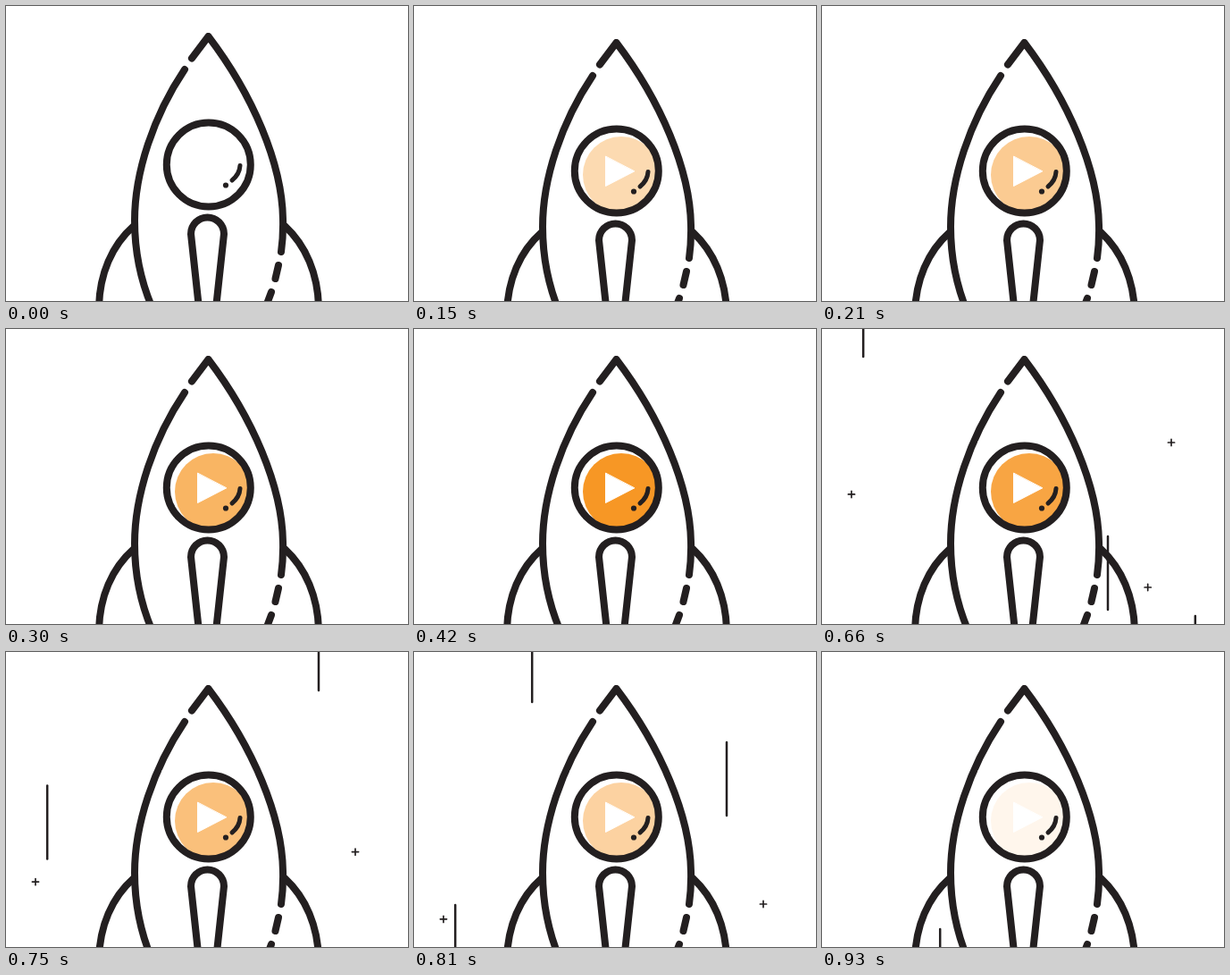
Animation of 450 by 330 pixels, one loop 960 ms. Source, as an HTML page without scripts:

```html
<!DOCTYPE html>
<html lang="en">
<head>
<meta charset="utf-8">
<title>Rocket</title>
<style>
  /* One stepped clock: 32 ticks of 30 ms per loop */
  @property --t { syntax: "<number>"; inherits: true; initial-value: 0; }
  @keyframes clock { from { --t: 0; } to { --t: 32; } }
  @keyframes shake { 0% { transform: none; } 50%, 100% { transform: translateY(7px); } }

  html, body { margin: 0; width: 100%; height: 100%; overflow: hidden; background: #fff; }
  svg {
    display: block;
    fill: none;
    stroke: #231f20;
    stroke-linecap: round;
    stroke-linejoin: round;
    animation: clock 960ms steps(32) infinite;
  }
  .rocket { stroke-width: 8; animation: shake 60ms step-end infinite; }
  .glass {
    fill: #f7941e;
    stroke: none;
    opacity: calc(min(1, var(--t) / 14.5, (32 - var(--t)) / 12));
  }
  .play { fill: #fff; stroke: #fff; stroke-width: 1; }
  .shine { stroke-width: 5; }
  .dot { fill: #231f20; stroke: none; }

  /* Height = y + v·t + c·t² */
  .sky use {
    transform: translate(var(--x), calc((var(--y) + var(--v) * var(--t) + var(--c, 0) * var(--t) * var(--t)) * 1px));
  }
</style>
</head>
<body>
<svg width="450" height="330" viewBox="0 0 450 330">
  <defs>
    <path id="streak" d="M0 1V83" stroke-width="2.5"/>
    <path id="plus" d="M-3.6 0H3.6M0-3.6V3.6" stroke-width="1.7"/>
  </defs>

  <g class="sky">
    <use href="#streak" style="--x:24.7px; --y:-138; --v:67"/>
    <use href="#streak" style="--x:323.5px; --y:-469; --v:70"/>
    <use href="#streak" style="--x:320px; --y:-1325.5; --v:70.75"/>
    <use href="#streak" style="--x:417.8px; --y:-890; --v:55"/>
    <use href="#streak" style="--x:128.2px; --y:-1019; --v:66"/>
    <use href="#streak" style="--x:72.7px; --y:-758; --v:60"/>
    <use href="#streak" style="--x:46.2px; --y:-1521.6; --v:66.8"/>
    <use href="#streak" style="--x:132.2px; --y:-2295; --v:84"/>
    <use href="#streak" style="--x:350px; --y:-1790; --v:70"/>

    <use href="#plus" style="--x:428.3px; --y:-87.8; --v:31.35; --c:-.477"/>
    <use href="#plus" style="--x:40px; --y:-195.5; --v:40.95; --c:-.65"/>
    <use href="#plus" style="--x:33px; --y:-692.3; --v:53.8; --c:-.633"/>
    <use href="#plus" style="--x:364.7px; --y:-517.3; --v:48.75; --c:-.55"/>
    <use href="#plus" style="--x:391px; --y:-911.4; --v:60.4; --c:-.6"/>
  </g>

  <g class="rocket">
    <!-- hull -->
    <path d="M208 58.5 226.5 34C276 99 309 176 310 238Q310.5 257 308 275"/>
    <path d="M200 71C165 123 144 186 144 240C144 275 150 305 163 336"/>
    <path d="M305 290 301.5 305M297 320 291 336"/>
    <!-- fins -->
    <path d="M143 246C118 268 105 300 104 336M312 246C336 268 349 300 350 336"/>
    <path d="M216 338 207 255A18.5 18.5 0 0 1 244 255L235 338"/>
    <!-- window -->
    <circle class="glass" cx="232" cy="182" r="43"/>
    <path class="play" d="M214.5 161.5V194.5L246.5 178Z"/>
    <circle cx="226.8" cy="177.5" r="47"/>
    <path class="shine" d="M262 178.5Q261.5 188 253 195"/>
    <circle class="dot" cx="246" cy="200.5" r="3.1"/>
  </g>
</svg>
</body>
</html>
```
